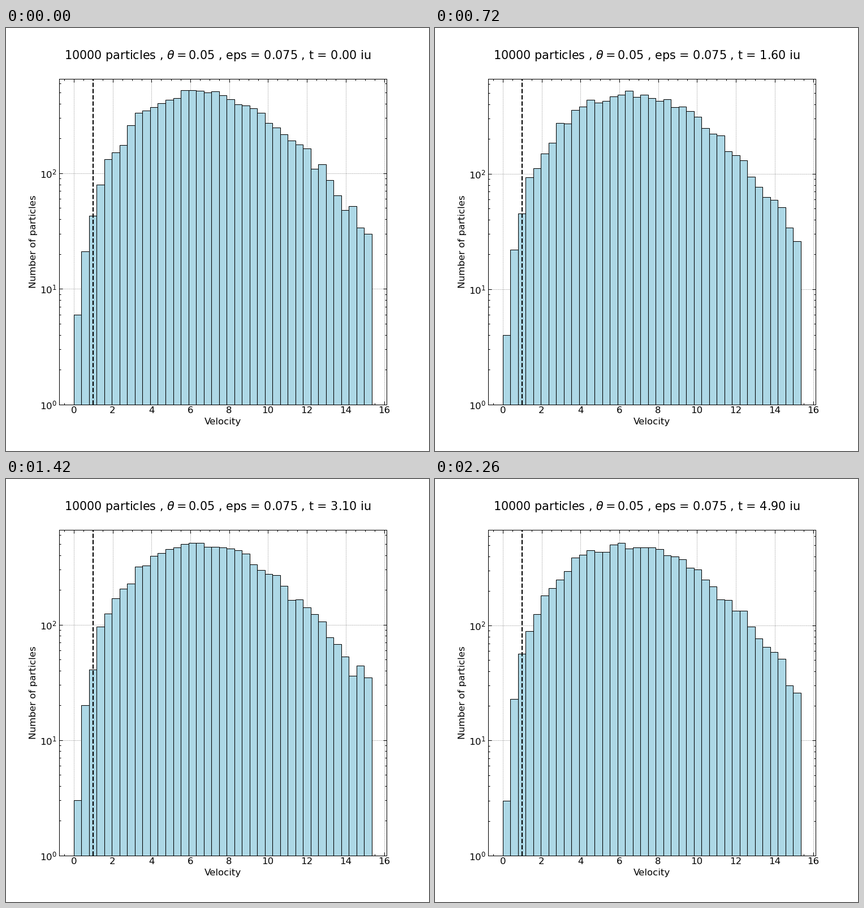
A matplotlib script for the animation above (2280 ms loop, 748x748 px).

```python
import numpy as np
import matplotlib.pyplot as plt
from matplotlib.animation import FuncAnimation

plt.rcParams.update({
    "font.family": "DejaVu Sans",
    "font.size": 16,
    "axes.linewidth": 1,
    "axes.axisbelow": True,
    "lines.linewidth": 2,
    "xtick.top": True, "ytick.right": True,
})
for axis in ("xtick", "ytick"):
    plt.rcParams.update({
        f"{axis}.direction": "in",
        f"{axis}.minor.visible": True,
        f"{axis}.major.size": 6, f"{axis}.minor.size": 3,
        f"{axis}.major.width": 1, f"{axis}.minor.width": 1,
    })

TICK_MS = 20
TICKS = 114
STEPS = 50
BINS = 39
V_MAX = 15.35
WIDTH = V_MAX / BINS


def expected(v):
    """Mean particles per bin: a Maxwell-like curve on a faint background."""
    return v ** 1.7 * np.exp(3.88 - 0.0195 * v**2 - 1.565e-5 * v**4) + 1.5


def step_at(tick):
    """Every second step of three is held for five ticks, the others for one."""
    cycle, rest = divmod(tick, 7)
    return 3 * cycle + (rest >= 1) + (rest >= 6)


edges = np.arange(BINS) * WIDTH
mean = expected(edges + WIDTH / 2)
rng = np.random.default_rng(7)
history = np.maximum(rng.poisson(mean, (STEPS, BINS)), 3)

fig, ax = plt.subplots(figsize=(10, 10), dpi=74.8)
ax.set_yscale("log")
ax.grid(True, which="major", color="k", alpha=0.5, lw=0.5, ls="--")
bars = ax.bar(edges, mean, WIDTH, align="edge",
              color="lightblue", edgecolor="black", linewidth=1)
ax.axvline(1, color="black", ls="--")
ax.set_xlim(-0.05 * V_MAX, 1.05 * V_MAX)
ax.set_xticks(range(0, 17, 2))
ax.set_xlabel("Velocity")
ax.set_ylabel("Number of particles")
title = fig.text(0.5, 1 - 55 / 748, "", size=20, ha="center", va="baseline")


def draw(tick):
    step = step_at(tick)
    counts = history[step]
    for bar, n in zip(bars, counts):
        bar.set_height(n)
    # 5 % margin on the log axis
    ax.set_ylim(1, counts.max() ** 1.05 / counts.min() ** 0.05)
    title.set_text(r"10000 particles , $\theta = 0.05$ , eps = 0.075 , "
                   f"t = {step / 10:.2f} iu")
    return [*bars, title]


anim = FuncAnimation(fig, draw, frames=TICKS, interval=TICK_MS,
                     init_func=lambda: draw(0), repeat=True)
plt.show()
```
